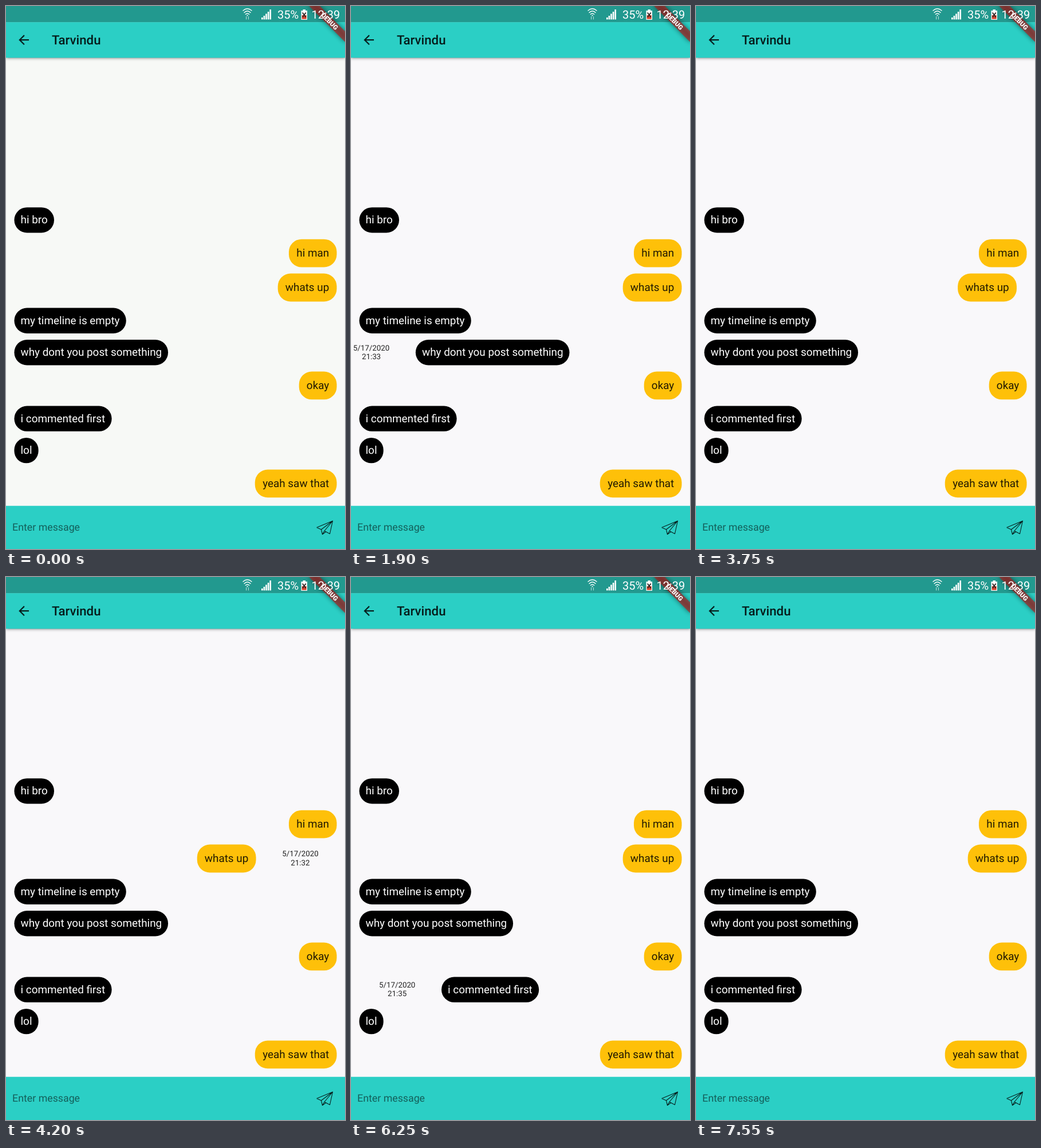
An HTML page for the animation above (8 s loop, 592x947 px).

```html
<!DOCTYPE html>
<html lang="en">
<head>
<meta charset="utf-8">
<title>Chat</title>
<style>
  html, body { margin: 0; width: 100%; height: 100%; overflow: hidden; }
  body { position: relative; font-family: Roboto, "Noto Sans", sans-serif; text-rendering: geometricPrecision; }
  /* The phone is laid out in its own 800 x 1280 pixels, then scaled down. */
  #phone { width: 800px; height: 1280px; transform: scale(.74); transform-origin: 0 0; }
  #phone, #phone div, svg { position: absolute; left: 0; top: 0; }
  #phone .status { width: 800px; height: 38px; background: #22998f; }
  #phone .bar { top: 38px; width: 800px; height: 84px; background: #2bcfc5;
    box-shadow: 0 2px 6px rgba(0,0,0,.3), 0 1px 2px rgba(0,0,0,.12); }
  #phone .title { left: 108px; top: 63px; font-size: 30px; font-weight: 500; line-height: 35px; color: rgba(0,0,0,.87); }
  #phone .input { top: 1178px; width: 800px; height: 104px; background: #2bcfc5; }
  #phone .hint { left: 15px; top: 1215px; font-size: 24px; line-height: 28px; color: rgba(0,0,0,.54); }
  #phone .row { width: 761px; height: 60px; }
  #phone .mine { height: 66px; }
  #phone .bubble { padding: 15px; border-radius: 30px; background: #000; color: #fff;
    font-size: 25.5px; line-height: 30px; white-space: nowrap; }
  #phone .mine .bubble { left: auto; right: 0; padding: 18px; background: #fec009; color: rgba(0,0,0,.87); }
  #phone .stamp { left: -172px; top: 9px; width: 135px; text-align: center;
    font-size: 18px; line-height: 21px; color: rgba(0,0,0,.87); }
  #phone .mine .stamp { left: auto; right: -172px; top: 12px; }
</style>
</head>
<body>
<div id="phone">
  <div class="input"></div>
  <div class="hint">Enter message</div>
  <div class="bar"></div>
  <div class="status"></div>
  <div class="title">Tarvindu</div>
</div>
<svg width="592" height="947" viewBox="0 0 592 947" font-family="Roboto, 'Noto Sans', sans-serif">
  <path transform="translate(17.8 45.9) scale(1.11)" fill="#06201f"
    d="M20 11H7.83l5.59-5.59L12 4l-8 8 8 8 1.41-1.41L7.83 13H20v-2z"/>
  <!-- send icon -->
  <path fill="none" stroke="#061f1d" stroke-width="1.1" stroke-linejoin="round"
    d="M542.5 909.5 570.5 898 565.5 920.5 556 915.5 570.5 898 550.500 913 542.5 909.5M550.5 913 552.500 921.5 556 915.5M552.5 921.5 558.500 917"/>
  <!-- debug ribbon -->
  <g transform="translate(592 0) rotate(45) scale(.74)">
    <rect x="-60" y="42" width="120" height="18" fill-opacity=".5" style="filter:blur(5.9px)"/>
    <rect x="-60" y="42" width="120" height="18" fill="#b71c1c" fill-opacity=".63"/>
    <text y="56.500" text-anchor="middle" font-size="15.3" font-weight="900" fill="#fff">DEBUG</text>
  </g>
  <!-- status icons -->
  <g fill="none" stroke="#fff" stroke-width="1.3" stroke-linecap="round">
    <path d="M414 8Q421.500 1.5 429 8M416 11.500Q421.500 6 427 11.500M418.3 14.5Q421.500 11.5 424.7 14.5"/>
    <path stroke-width="1.1" stroke="#b5dcd8" d="M419.6 18.5V23M423.4 18.5V23"/>
  </g>
  <g fill="#fff">
    <circle cx="421.5" cy="16.5" r="1.1"/>
    <path d="M446 20h2.6v3.5H446zM449.6 17h2.6v6.5h-2.6zM453.2 13.5h2.6v10h-2.6zM456.8 10h2.6v13.5h-2.6zM460.4 6h2.6v17.5h-2.6z"/>
    <path d="M518.5 6h4.5v2h3v16h-10.500V8h3z"/>
    <text x="474" y="21.700" font-size="20">35%</text>
    <text x="533.5" y="21.700" font-size="20">12:39</text>
  </g>
  <path fill="#d9452f" d="M516.700 16h8v6.800h-8z"/>
  <path fill="none" stroke="#2c2020" stroke-width="1.8" d="M517.700 11.500l6 8m0-8l-6 8"/>
</svg>
<script>
const LOOP = 8000, STEP = 50, MARGIN = 19.5, GAP = 15;
const phone = document.getElementById('phone');

// Drags are [time, offset] points.
const messages = [
  { text: 'hi bro' },
  { text: 'hi man', mine: true },
  { text: 'whats up', mine: true, stamp: '21:32',
    drag: [[3700, 0], [3900, -95], [4200, -190.5], [4550, -190.5], [4700, -142], [4950, -20], [5050, 0]] },
  { text: 'my timeline is empty' },
  { text: 'why dont you post something', stamp: '21:33',
    drag: [[1600, 0], [1750, 54], [1900, 133], [2150, 158], [2250, 158], [2400, 181], [2500, 181], [2650, 103], [2800, 0]] },
  { text: 'okay', mine: true },
  { text: 'i commented first', stamp: '21:35',
    drag: [[5600, 0], [5750, 61], [6000, 169], [6250, 194], [6900, 194], [7050, 135], [7250, 20], [7400, 0]] },
  { text: 'lol' },
  { text: 'yeah saw that', mine: true }
];

function add(parent, className, html = '') {
  const el = document.createElement('div');
  el.className = className;
  el.innerHTML = html;
  parent.append(el);
  return el;
}

function place(m, x) {
  m.row.style.transform = `translate(${MARGIN + x}px, ${m.y}px)`;
}

let y = 474.5;
const input = phone.querySelector('.input');
for (const m of messages) {
  m.y = y;
  m.row = add(phone, m.mine ? 'row mine' : 'row');
  input.before(m.row);
  add(m.row, 'bubble', m.text);
  if (m.stamp) add(m.row, 'stamp', '5/17/2020<br>' + m.stamp);
  place(m, 0);
  y += (m.mine ? 66 : 60) + GAP;
}

function valueAt(points, t) {
  const next = points.findIndex(p => p[0] > t);
  if (next <= 0) return 0;
  const [t0, x0] = points[next - 1], [t1, x1] = points[next];
  return x0 + (x1 - x0) * (t - t0) / (t1 - t0);
}

const start = performance.now();
function draw(now) {
  const t = Math.floor(Math.max(0, now - start) % LOOP / STEP) * STEP;
  const k = Math.min(1, Math.max(0, (t - 50) / 850));
  const mix = (a, b) => a + (b - a) * k;
  document.body.style.background = `rgb(${mix(247, 249)}, ${mix(249, 248)}, ${mix(246, 250)})`;
  for (const m of messages) if (m.drag) place(m, valueAt(m.drag, t));
  requestAnimationFrame(draw);
}
draw(start);
</script>
</body>
</html>
```
